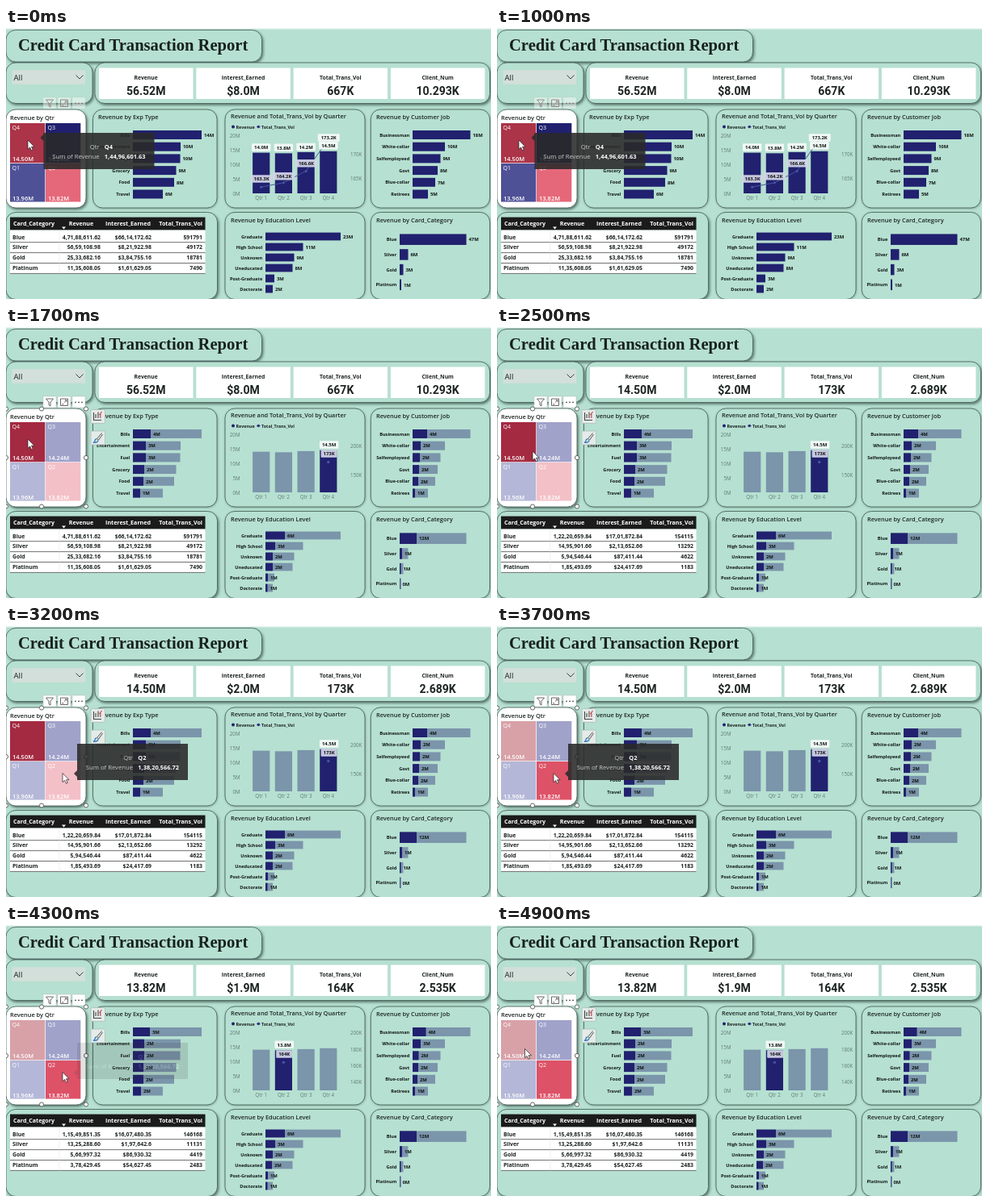
Recreate the animation shown at these times as an HTML page. Size 600x336 px, loop 5000 ms.

```html
<!DOCTYPE html>
<html lang="en">
<head>
<meta charset="utf-8">
<title>Credit Card Transaction Report</title>
<style>
  html, body { margin: 0; width: 100%; height: 100%; overflow: hidden; background: #b6e0d1; }
  svg { display: block; width: 100vw; height: 100vh; }
  text { font-family: "Open Sans", "Noto Sans", sans-serif; font-weight: 600; fill: #1c2422; white-space: pre; }
  .report { font: bold 20.6px "Liberation Serif", serif; fill: #17211f; }
  .title { font-size: 7.4px; }
  .name { font-size: 5.6px; font-weight: 700; fill: #101615; }
  .small { font-size: 5.9px; font-weight: 700; fill: #101615; }
  .legend { font-size: 5.4px; font-weight: 700; }
  .axis { font-size: 6.2px; font-weight: 400; fill: #607c75; }
  .kpiName { font-size: 6.8px; font-weight: 700; }
  .kpi { font: 700 14px Roboto, sans-serif; }
  .cell { font-size: 6.9px; font-weight: 700; }
  .head { font-size: 7.1px; font-weight: 700; fill: #fff; }
  .tile { font-size: 7.5px; fill: #fff; }
  .tag { font-size: 7px; font-weight: 400; fill: #fff; }
  .tipName { font-size: 7.7px; font-weight: 400; fill: #c8c8c8; }
  .tipValue { font-size: 7.4px; font-weight: 700; fill: #fff; }
</style>
</head>
<body>
<svg viewBox="0 0 600 336" preserveAspectRatio="none">
  <defs>
    <filter id="deep" x="-10%" y="-10%" width="120%" height="130%">
      <feDropShadow dx="1.5" dy="2" stdDeviation="1.5" flood-color="#20352f" flood-opacity=".6"/>
    </filter>
    <filter id="soft" x="-10%" y="-10%" width="120%" height="130%">
      <feDropShadow dx=".5" dy=".7" stdDeviation=".8" flood-color="#20352f" flood-opacity=".4"/>
    </filter>
  </defs>
  <g id="frame"></g>
  <g id="cards"></g>
  <g id="tree"></g>
  <g id="charts"></g>
  <g id="tools"></g>
  <g id="tip"></g>
  <path id="cursor" d="M0 0V11.2L2.6 8.9L4.4 12.8L6.2 12L4.5 8.2H8Z" fill="#fff" stroke="#222" stroke-width=".7"/>
</svg>
<script>
const LOOP = 5000;
const NAVY = "#21216f", PALE = "#7b95ab", MINT = "#b6e0d1";
const $ = id => document.getElementById(id);

const rect = (x, y, w, h, fill, more = "") =>
  `<rect x="${x}" y="${y}" width="${w}" height="${h}" fill="${fill}" ${more}/>`;
const text = (x, y, s, cls, anchor = "start") =>
  `<text x="${x}" y="${y}" class="${cls}" text-anchor="${anchor}">${s}</text>`;
const line = (d, color, width = 0.8) =>
  `<path d="${d}" fill="none" stroke="${color}" stroke-width="${width}"/>`;
const panel = (x, y, w, h, shade = "deep", fill = MINT) =>
  rect(x, y, w, h, fill, `rx="12" stroke="#3f5a53" stroke-width=".8" filter="url(#${shade})"`);

// Rows: name, full label, bar end, then label and highlight end for Q4 and Q2
const barCharts = [
  { x: 157, y: 132.5, step: 14.7, h: 11, rows: [
    ["Bills", "14M", 242, "4M", 179, "3M", 178],
    ["Entertainment", "10M", 216, "3M", 173, "2M", 171],
    ["Fuel", "10M", 215.5, "3M", 173, "2M", 171],
    ["Grocery", "9M", 210.5, "2M", 171, "2M", 170],
    ["Food", "8M", 208, "2M", 170, "2M", 170],
    ["Travel", "6M", 194, "1M", 166, "2M", 167]] },
  { x: 503, y: 132.5, step: 14.7, h: 11, rows: [
    ["Businessman", "18M", 574.5, "4M", 521, "4M", 519.5],
    ["White-collar", "10M", 543, "2M", 513, "3M", 513],
    ["Selfemployeed", "9M", 537.5, "2M", 512, "2M", 510.5],
    ["Govt", "8M", 534, "2M", 511, "2M", 510],
    ["Blue-collar", "7M", 531, "2M", 510, "2M", 509],
    ["Retirees", "5M", 522, "1M", 506, "1M", 506]] },
  { x: 321, y: 258.5, step: 13, h: 9.8, rows: [
    ["Graduate", "23M", 414, "6M", 345, "6M", 345],
    ["High School", "11M", 367.5, "3M", 333, "3M", 333],
    ["Unknown", "9M", 356.5, "2M", 330, "2M", 330],
    ["Uneducated", "8M", 354.5, "2M", 330, "2M", 329],
    ["Post-Graduate", "3M", 332, "1M", 324, "1M", 324],
    ["Doctorate", "2M", 330, "1M", 323.5, "1M", 323.5]] },
  { x: 487, y: 262.2, step: 18.7, h: 13.5, rows: [
    ["Blue", "47M", 569.5, "12M", 508, "12M", 508],
    ["Silver", "6M", 497.5, "1M", 490, "1M", 490],
    ["Gold", "3M", 491.5, "1M", 488.5, "1M", 488.5],
    ["Platinum", "1M", 489, "0M", 487.5, "0M", 487.5]] }
];

const kpis = [
  ["56.52M", "$8.0M", "667K", "10.293K"],
  ["14.50M", "$2.0M", "173K", "2.689K"],
  ["13.82M", "$1.9M", "164K", "2.535K"]
];
const tables = [
  ["4,71,88,611.62 $66,14,172.62 591791", "56,59,108.98 $8,21,922.98 49172",
   "25,33,682.16 $3,84,755.16 18781", "11,35,608.05 $1,61,629.05 7490"],
  ["1,22,20,659.84 $17,01,872.84 154115", "14,95,901.66 $2,13,652.66 13292",
   "5,94,546.44 $87,411.44 4622", "1,85,493.69 $24,417.69 1183"],
  ["1,15,49,851.35 $16,07,480.35 146168", "13,25,288.60 $1,97,642.6 11131",
   "5,66,997.32 $86,930.32 4419", "3,78,429.45 $54,627.45 2483"]
];

function frame() {
  return rect(0, 0, 600, 1.5, "#edf5f2") +
    panel(0, 2.5, 316.5, 39.5) + text(15, 28, "Credit Card Transaction Report", "report") +
    panel(0, 43, 107, 50.5) + panel(110, 43, 488.5, 50.5) +
    rect(7.5, 52.3, 90.5, 17.5, "#d3dfda") +
    `<text x="9.5" y="65" font-size="9.6" style="font-weight:400">All</text>` +
    line("M86.5 58.5L91 63L95.5 58.5", "#33443f", 1) +
    panel(0, 101, 99, 122, "deep", "#fff") +
    panel(107.5, 101, 153.5, 122, "soft") + panel(271, 101, 173, 122, "soft") +
    panel(451.3, 101, 147.2, 122, "soft") + panel(0, 228.5, 261.5, 108) +
    panel(271, 228.5, 173, 108, "soft") + panel(451.3, 228.5, 147.2, 108, "soft") +
    text(5, 113.8, "Revenue by Qtr", "title") +
    text(114, 113, "Revenue by Exp Type", "title") +
    text(278, 112, "Revenue and Total_Trans_Vol by Quarter", "title") +
    text(458, 113, "Revenue by Customer Job", "title") +
    text(278, 240.5, "Revenue by Education Level", "title") +
    text(458, 240.5, "Revenue by Card_Category", "title");
}

function cards(k) {
  const names = ["Revenue", "Interest_Earned", "Total_Trans_Vol", "Client_Num"];
  let s = names.map((name, i) => {
    const x = 115 + i * 120.3;
    return rect(x, 49.5, 116.5, 38.5, "#fff") +
      text(x + 58.2, 63.6, name, "kpiName", "middle") +
      text(x + 58.2, 83.2, kpis[k][i], "kpi", "middle");
  }).join("");
  s += rect(5, 234.6, 241.5, 16, "#1b1b1b") + rect(5, 250.6, 241.5, 54, "#fff") +
    text(9, 245, "Card_Category", "head") + text(93, 245, "Revenue", "head", "middle") +
    text(151, 245, "Interest_Earned", "head", "middle") + text(243, 245, "Total_Trans_Vol", "head", "end") +
    `<path d="M69 246.5h5l-2.5 3z" fill="#fff"/>`;
  ["Blue", "Silver", "Gold", "Platinum"].forEach((name, i) => {
    const y = 261.5 + i * 12.9;
    s += text(8, y, name, "cell") + line(`M5 ${y + 4.2}H246.5`, "#4d4d4d", 0.8);
    tables[k][i].split(" ").forEach((v, j) => s += text([117, 180, 243][j], y, v, "cell", "end"));
  });
  return s + line("M66 250.6V304.5", "#dcdcdc", 0.5);
}

function tree(k) {
  const fills = [
    ["#ab3448", "#20206f", "#4f5197", "#e5687a"],
    ["#a42a41", "#a0a2ca", "#b4b7d7", "#f4c0c7"],
    ["#d8a1a8", "#a0a2ca", "#b4b7d7", "#dd5267"]
  ][k];
  return [["Q4", "14.50M"], ["Q3", "14.24M"], ["Q1", "13.96M"], ["Q2", "13.82M"]].map(([q, v], i) => {
    const x = i % 2 ? 49 : 5, low = i > 1, y = low ? 168 : 118;
    return rect(x, y, 43.3, low ? 47.5 : 49.3, fills[i]) +
      text(x + 2.5, y + 8, q, "tag") + text(x + 3, low ? 214 : 165, v, "tile");
  }).join("");
}

function bars({ x, y, step, h, rows }, k) {
  return rows.map((r, i) => {
    const cy = y + i * step, top = cy - h / 2;
    const end = k ? r[2 + 2 * k] : r[2];
    const label = k ? r[1 + 2 * k] : r[1];
    return rect(x, top, r[2] - x, h, k ? PALE : NAVY) +
      (k ? rect(x, top, end - x, h, NAVY) : "") +
      text(x - 3.8, cy + 2.1, r[0], "name", "end") + text(end + 3, cy + 2.2, label, "small");
  }).join("");
}

const badge = (x, y, s, fill = "#f4faf8") => {
  const w = s.length * 3.5 + 6;
  return rect(x - w / 2, y - 4.8, w, 9.6, fill, 'rx="1" fill-opacity=".93"') +
    text(x, y + 2.2, s, "small", "middle");
};

function combo(k) {
  const millions = [14, 13.8, 14.2, 14.5], volume = [163.3, 164.2, 166.6, 173.2];
  const cx = i => 315.7 + i * 27.7;
  const picked = [-1, 3, 1][k];
  const lilac = "#d3d4e6";
  const [ticks, at] = [
    [[170, 165], v => 157 + (170 - v) * 6],
    [[200, 150], v => 148 + (200 - v) * 0.72],
    [[200, 180, 160, 140], v => 134 + (200 - v) * 1.01]
  ][k];
  let s = `<circle cx="281" cy="122.5" r="2" fill="${NAVY}"/>` + text(284.5, 124.5, "Revenue", "legend") +
    line("M310 122.5H314.6", "#41509d", 0.8) + `<circle cx="312.3" cy="122.5" r="1.8" fill="#2d3480"/>` +
    text(316, 124.5, "Total_Trans_Vol", "legend");
  for (let i = 0; i < 5; i++) s += text(289.5, 135.8 + i * 18, 20 - i * 5 + "M", "axis", "end");
  ticks.forEach(v => s += text(426, at(v) + 2.3, v + "K", "axis"));
  millions.forEach((v, i) => {
    const h = v * 3.6;
    s += rect(cx(i) - 10.6, 205 - h, 21.2, h, k && i !== picked ? PALE : NAVY) +
      text(cx(i), 212.5, "Qtr " + (i + 1), "axis", "middle");
  });
  if (k) {
    const x = cx(picked), vol = Math.round(volume[picked]);
    return s + `<circle cx="${x}" cy="${at(vol)}" r="1.7" fill="#4656a4"/>` +
      badge(x + .8, k === 1 ? 146 : 148.3, millions[picked].toFixed(1) + "M") +
      badge(x + .8, k === 1 ? 157 : 160, vol + "K", lilac);
  }
  s += line("M" + volume.map((v, i) => `${cx(i)} ${at(v)}`).join("L"), "#4656a4", 1);
  volume.forEach((v, i) => {
    s += `<circle cx="${cx(i)}" cy="${at(v)}" r="1.5" fill="#4656a4"/>` +
      badge(cx(i), [148, 148.3, 147.5, 145.7][i], millions[i].toFixed(1) + "M") +
      badge(cx(i) + .4, [187, 183.8, 167.7, 136][i], v + "K", i < 3 ? lilac : undefined);
  });
  return s;
}

const charts = k => barCharts.map(c => bars(c, k)).join("") + combo(k);

function tools(on) {
  const ink = on ? "#444" : "#85706f";
  let s = "";
  [46, 64, 82].forEach(x => s += rect(x, 86, 16, 14, "#fff",
    `fill-opacity="${on ? 1 : .45}" stroke="#b5bdba" stroke-width="${on ? .5 : .2}"`));
  s += line("M49.5 89H58.5L55 93.2V98L53 96.8V93.2Z", ink) +
    line("M67.5 89H76.5V97.5H67.5ZM72 93.5L75 90.7M72.8 90.7H75V92.8M69 95.8H71.5", ink);
  [86, 90, 94].forEach(x => s += `<circle cx="${x}" cy="93.3" r=".9" fill="${ink}"/>`);
  if (!on) return s;
  [[0, 101.5], [44, 101.5], [99, 101.5], [0, 162], [99, 162], [0, 222.5], [44, 222.5], [99, 222.5]]
    .forEach(([x, y]) => s += `<circle cx="${x}" cy="${y}" r="2.6" fill="#fff" stroke="#444" stroke-width=".8"/>`);
  [102.5, 129].forEach(y => s += rect(105, y, 17.5, 17, "#e4ebe9", 'rx="1.5" stroke="#a5b3af" stroke-width=".6"'));
  return s + line("M108.5 106V115.5H118M111 113V108M114 113V105.5", "#444", 1.1) +
    line("M116.8 113V107.5M118.5 105L115.5 109", "#c64752", 1.2) +
    line("M118.5 131.5L112.5 138.5L114.5 140.2L119.5 133", "#444", 0.9) +
    line("M112 139Q110 139 109.8 141.8Q109 143 107.8 143Q113 144 114 140.5", "#3c82bd", 1.3);
}

function tip(k) {
  const [x, y, arrow, q, v] = k ? [88, 146, 183, "Q2", "1,38,20,566.72"] : [46.5, 130, 136, "Q4", "1,44,96,601.63"];
  return `<path d="M${x} ${y}h137v45h-137V${arrow + 4}l-4 -4l4 -4z" fill="#2a2a2a" fill-opacity=".88"/>` +
    text(x + 69, y + 19.7, "Qtr", "tipName", "end") + text(x + 75.3, y + 19.7, q, "tipValue") +
    text(x + 69, y + 32.2, "Sum of Revenue", "tipName", "end") + text(x + 75.3, y + 32.2, v, "tipValue");
}

// Linear interpolation through [time, ...values] stops
function track(stops, t) {
  const i = stops.findIndex(s => s[0] > t);
  if (i < 0) return stops[stops.length - 1].slice(1);
  const a = stops[i - 1], b = stops[i], p = (t - a[0]) / (b[0] - a[0]);
  return a.slice(1).map((v, j) => v + (b[j + 1] - v) * p);
}

const path = [[0, 27, 139], [2200, 27, 139], [2500, 44, 154], [2950, 70, 182.5],
  [4500, 70, 182.5], [4800, 44, 160], [4900, 34.5, 153.5]];
const fade = [[0, 1], [1300, 1], [1550, 0], [3000, 0], [3200, 1], [4120, 1], [4300, .15], [4400, 0]];
const phase = (t, a, b) => t < a ? 0 : t < b ? 1 : 2;

const shown = {};
function put(id, build, key) {
  if (shown[id] === key) return;
  shown[id] = key;
  $(id).innerHTML = build(key);
}

function draw(t) {
  put("frame", frame, 0);
  put("cards", cards, phase(t, 2100, 4100));
  put("tree", tree, phase(t, 1500, 3500));
  put("charts", charts, phase(t, 1500, 4000));
  put("tools", tools, t >= 1500);
  put("tip", tip, t < 2500 ? 0 : 1);
  $("tip").setAttribute("opacity", track(fade, t)[0]);
  $("cursor").setAttribute("transform", `translate(${track(path, t)})`);
}

const start = performance.now();
function tick() {
  draw(Math.max(0, performance.now() - start) % LOOP);
  requestAnimationFrame(tick);
}
tick();
</script>
</body>
</html>
```
